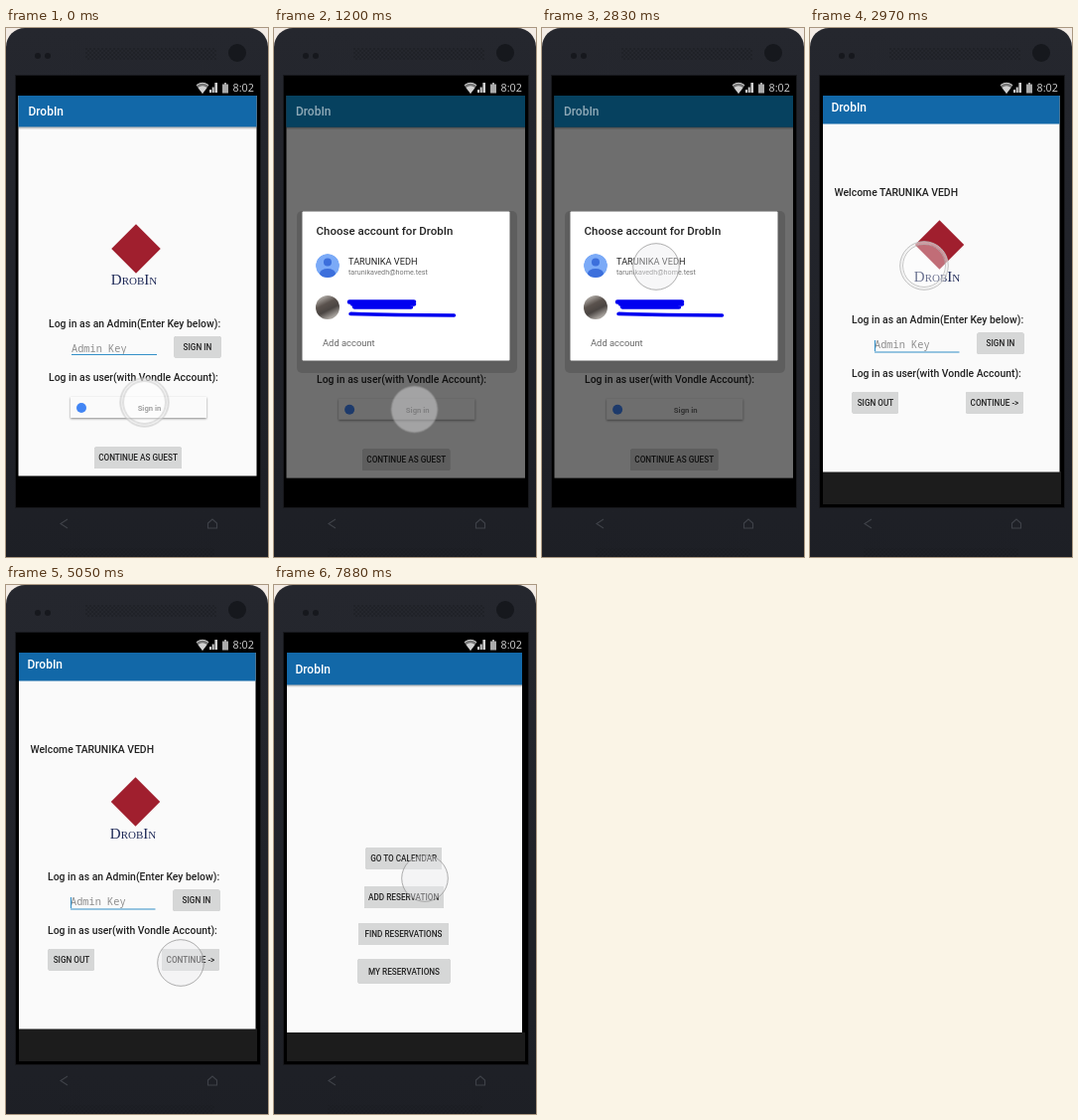
An HTML page for the animation above (8 s loop, 264 by 532 pixels).

```html
<!DOCTYPE html>
<html lang="en">
<head>
<meta charset="utf-8">
<title>DrobIn sign-in</title>
<style>
html, body { margin: 0; width: 100%; height: 100%; overflow: hidden; background: #f3ece5; }
svg { display: block; width: 264px; height: 532px; font-family: Roboto, "Open Sans", sans-serif; }

.bar { fill: #1268a8; }
.page { fill: #fafafa; }
.title { font-size: 12px; font-weight: 500; fill: #fff; }
.label { font-size: 10.4px; font-weight: 500; fill: #222; }
.btn rect { fill: #d6d7d7; rx: 1.5px; filter: drop-shadow(0 .7px .7px rgba(0,0,0,.3)); }
.btn text { font-size: 8.2px; font-weight: 500; fill: #222; text-anchor: middle; }
.hint { font: 10.3px "Noto Sans Mono", "DejaVu Sans Mono", monospace; fill: #8e8e8e; }
.field { stroke: #3490c8; stroke-width: 1.1; }
.word { font: 15px "Liberation Serif", "Noto Serif", serif; font-variant: small-caps; fill: #1f2a58; text-anchor: middle; }
.mark { fill: #a01f2e; }
.card { fill: #fafafa; filter: drop-shadow(0 1px 1px rgba(0,0,0,.45)); }
.navbar { fill: #1c1c1c; }

.login, .dialog, .welcome, .menu, .touch, .soft, .ring { animation: 8s step-end infinite; }
.login { animation-name: login; transform-origin: 13px 68px; }
.dialog { animation-name: dialog; }
.welcome { animation-name: welcome; }
.menu { animation-name: menu; }
.touch { animation-name: move; }
.ring { animation-name: press; }
.soft { animation-name: lift; }

@keyframes login {
  0% { opacity: 1; transform: none; }
  15% { opacity: 1; transform: scale(1.002, 1.0055); }
  37.125%, 100% { opacity: 0; }
}
@keyframes dialog {
  0%, 37.125%, 100% { opacity: 0; }
  15% { opacity: 1; }
}
@keyframes welcome {
  0%, 85.5%, 100% { opacity: 0; }
  37.125% { opacity: 1; }
}
@keyframes menu {
  0% { opacity: 0; }
  85.5%, 100% { opacity: 1; }
}
@keyframes press {
  0%, 37.125%, 85.5% { opacity: 1; }
  3.75%, 46.5%, 94.875%, 100% { opacity: 0; }
}
@keyframes lift {
  0%, 37.125%, 85.5% { opacity: 0; }
  3.75%, 46.5%, 94.875%, 100% { opacity: 1; }
}
@keyframes move {
  0% { transform: translate(139.5px, 376.5px); }
  3.75% { transform: translate(140px, 380px); }
  5.625% { transform: translate(141.5px, 383.5px); }
  22.5% { transform: translate(140px, 372px); }
  24.375% { transform: translate(136px, 344px); }
  26.125% { transform: translate(129px, 309px); }
  28% { transform: translate(121px, 273px); }
  29.875% { transform: translate(115px, 244px); }
  31.625% { transform: translate(114px, 228px); }
  35.375% { transform: translate(115px, 240px); }
  37.125% { transform: translate(115px, 239px); }
  46.5% { transform: translate(115px, 251px); }
  48.375% { transform: translate(118px, 284px); }
  50.125% { transform: translate(126px, 325px); }
  52% { transform: translate(136px, 362px); }
  53.875% { transform: translate(150px, 381px); }
  55.75% { transform: translate(163px, 388px); }
  57.625% { transform: translate(171px, 388px); }
  59.5% { transform: translate(175px, 386px); }
  61.25% { transform: translate(176px, 383px); }
  63.125% { transform: translate(176px, 380px); }
  65% { transform: translate(176px, 378px); }
  83.75% { transform: translate(176.5px, 377px); }
  85.5% { transform: translate(177px, 378px); }
  94.875% { transform: translate(172px, 358px); }
  96.75% { transform: translate(161px, 325px); }
  98.5%, 100% { transform: translate(152px, 295px); }
}
</style>
</head>
<body>
<svg viewBox="0 0 264 532">
  <defs>
    <linearGradient id="shell" x1="0" y1="0" x2="0" y2="1">
      <stop offset="0" stop-color="#25272e"/>
      <stop offset="1" stop-color="#1d1f25"/>
    </linearGradient>
    <linearGradient id="photo" x1="0" y1="0" x2=".5" y2="1">
      <stop offset="0" stop-color="#d8d5d0"/>
      <stop offset=".45" stop-color="#5a524d"/>
      <stop offset=".7" stop-color="#4a4542"/>
      <stop offset="1" stop-color="#a8a39e"/>
    </linearGradient>
    <linearGradient id="fade" x1="0" y1="0" x2="0" y2="1">
      <stop offset="0" stop-opacity=".3"/>
      <stop offset="1" stop-opacity="0"/>
    </linearGradient>
    <pattern id="mesh" width="4" height="4" patternUnits="userSpaceOnUse">
      <circle cx="1" cy="1" r=".8" fill="#191b20"/>
      <circle cx="3" cy="3" r=".8" fill="#191b20"/>
    </pattern>
    <clipPath id="face"><circle cx="54" cy="239" r="12"/></clipPath>
  </defs>

  <!-- phone -->
  <rect width="264" height="560" rx="19" fill="url(#shell)"/>
  <rect x="80" y="20" width="132" height="12" fill="url(#mesh)"/>
  <rect x="54" y="523" width="156" height="9" fill="url(#mesh)"/>
  <g fill="#16181d">
    <circle cx="32" cy="28" r="3"/>
    <circle cx="42" cy="28" r="3"/>
    <circle cx="233" cy="25" r="9"/>
  </g>
  <rect x="9.5" y="47.5" width="247" height="435" fill="#000" stroke="#17181c"/>
  <g fill="none" stroke="#3f4249" stroke-width="1.1">
    <path d="M62 494l-7 4.500 7 4.500"/>
    <path d="M203.500 498l4.500-4 4.500 4v5h-9z"/>
  </g>

  <!-- status bar -->
  <g fill="#d0d0d0">
    <path d="M198 66l-6.500-8.500q6.500-5 13 0z" fill="#777"/>
    <path d="M198 66l-4.500-6q4.500-3.500 9 0z"/>
    <path d="M192 57.500q6-4.500 12 0" fill="none" stroke="#d0d0d0"/>
    <path d="M205 65v-3h2v3zm2.700 0v-5.500h2v5.500zm2.700 0v-10h2.600v10z"/>
    <path d="M218 56.500h2v-1.500h2v1.500h2v9h-6z" fill="#aaa"/>
    <text x="228.500" y="64" font-size="10.800" font-family="Open Sans, Noto Sans, sans-serif">8:02</text>
  </g>

  <g class="login">
    <rect class="page" x="12.500" y="68" width="240" height="382.500"/>
    <rect class="bar" x="12.500" y="68" width="240" height="31.500"/>
    <rect x="12.500" y="99.500" width="240" height="3" fill="url(#fade)"/>
    <text class="title" x="22.500" y="88">DrobIn</text>
    <rect class="mark" x="113.500" y="204.500" width="35" height="35" transform="rotate(45 131 222)"/>
    <text class="word" x="129" y="258">DrobIn</text>
    <text class="label" x="43" y="301">Log in as an Admin(Enter Key below):</text>
    <text class="hint" x="66" y="325.500">Admin Key</text>
    <path class="field" d="M66 328.500h86"/>
    <g class="btn"><rect x="169.500" y="310" width="47" height="21.500"/><text x="193" y="324">SIGN IN</text></g>
    <text class="label" x="43" y="355">Log in as user(with Vondle Account):</text>
    <rect class="card" x="65" y="371" width="137" height="21"/>
    <circle cx="76" cy="382" r="5" fill="#4285f4"/>
    <text x="144.500" y="385" font-size="7.700" font-weight="700" fill="#707070" text-anchor="middle">Sign in</text>
    <g class="btn"><rect x="89" y="421.500" width="88" height="21.500"/><text x="133" y="435">CONTINUE AS GUEST</text></g>
  </g>

  <g class="dialog">
    <rect x="12" y="68" width="243" height="387" opacity=".56"/>
    <rect x="12.500" y="68" width="240.500" height="31.500" fill="#06415f"/>
    <text class="title" x="22" y="88" opacity=".55">DrobIn</text>
    <rect x="23" y="184" width="222" height="163" rx="5" opacity=".14"/>
    <rect x="28.500" y="184.500" width="209" height="150" rx="1" fill="#fff"/>
    <text x="42.500" y="208" font-size="11.500" font-weight="500" fill="#222">Choose account for DrobIn</text>
    <g clip-path="url(#face)">
      <circle cx="54" cy="239" r="12" fill="#7baaf7"/>
      <circle cx="54" cy="235.500" r="4" fill="#3c6fdc"/>
      <ellipse cx="54" cy="247" rx="8" ry="5" fill="#3c6fdc"/>
    </g>
    <text x="75" y="238" font-size="9.200" fill="#222">TARUNIKA VEDH</text>
    <text x="75" y="248" font-size="7.200" fill="#777">tarunikavedh@home.test</text>
    <circle cx="54" cy="281" r="12" fill="url(#photo)"/>
    <g fill="none" stroke="#0000f0" stroke-linejoin="round" stroke-linecap="round">
      <path d="M76 275.500h65l-62 2 62 0-60 3 57 0" stroke-width="4.500"/>
      <path d="M77 287.500l50 1 54.500 .5-60-.5z" stroke-width="3.500"/>
    </g>
    <text x="49" y="320" font-size="9.400" fill="#666">Add account</text>
  </g>

  <g class="welcome">
    <rect class="navbar" x="13" y="446" width="240" height="33"/>
    <rect class="page" x="13" y="68" width="238.500" height="378.500"/>
    <rect class="bar" x="13" y="68" width="238.500" height="28.500"/>
    <text class="title" x="21.500" y="84">DrobIn</text>
    <text class="label" x="24.500" y="169">Welcome TARUNIKA VEDH</text>
    <rect class="mark" x="113" y="200.500" width="35" height="35" transform="rotate(45 130.500 218)"/>
    <text class="word" x="128" y="254.500">DrobIn</text>
    <text class="label" x="42" y="297">Log in as an Admin(Enter Key below):</text>
    <text class="hint" x="65" y="321.500">Admin Key</text>
    <path class="field" d="M65 326h85.500M65.500 314v11"/>
    <g class="btn"><rect x="168.500" y="306.500" width="47" height="21.500"/><text x="192" y="320">SIGN IN</text></g>
    <text class="label" x="42" y="351">Log in as user(with Vondle Account):</text>
    <g class="btn"><rect x="42.500" y="366" width="46.500" height="21.500"/><text x="66" y="380">SIGN OUT</text></g>
    <g class="btn"><rect x="157" y="366" width="58" height="21.500"/><text x="186" y="380">CONTINUE -&gt;</text></g>
  </g>

  <g class="menu">
    <rect x="13" y="68" width="240" height="411"/>
    <rect class="navbar" x="13" y="450" width="240" height="29"/>
    <rect class="page" x="13" y="68" width="237" height="382"/>
    <rect class="bar" x="13" y="68" width="237" height="32.500"/>
    <rect x="13" y="100.500" width="237" height="2.500" fill="url(#fade)"/>
    <text class="title" x="21.500" y="89">DrobIn</text>
    <g class="btn"><rect x="92.500" y="264" width="76.500" height="22"/><text x="130.700" y="278">GO TO CALENDAR</text></g>
    <g class="btn"><rect x="91" y="303" width="80" height="22"/><text x="130.700" y="317">ADD RESERVATION</text></g>
    <g class="btn"><rect x="85" y="340" width="91" height="22"/><text x="130.500" y="354">FIND RESERVATIONS</text></g>
    <g class="btn"><rect x="84.500" y="376" width="93" height="24.500"/><text x="131" y="391.500">MY RESERVATIONS</text></g>
  </g>

  <g class="touch">
    <g class="soft">
      <circle r="23.300" fill="#ebebee" fill-opacity=".42" stroke="#8c8c8c" stroke-opacity=".7"/>
    </g>
    <g class="ring" fill="none">
      <circle r="21.500" fill="#fff" fill-opacity=".35" stroke="#b0b0b0" stroke-width=".8"/>
      <circle r="23" stroke="#eee" stroke-opacity=".6" stroke-width="2.500"/>
      <circle r="24.300" stroke="#bbb" stroke-width=".9"/>
    </g>
  </g>
</svg>
</body>
</html>
```
